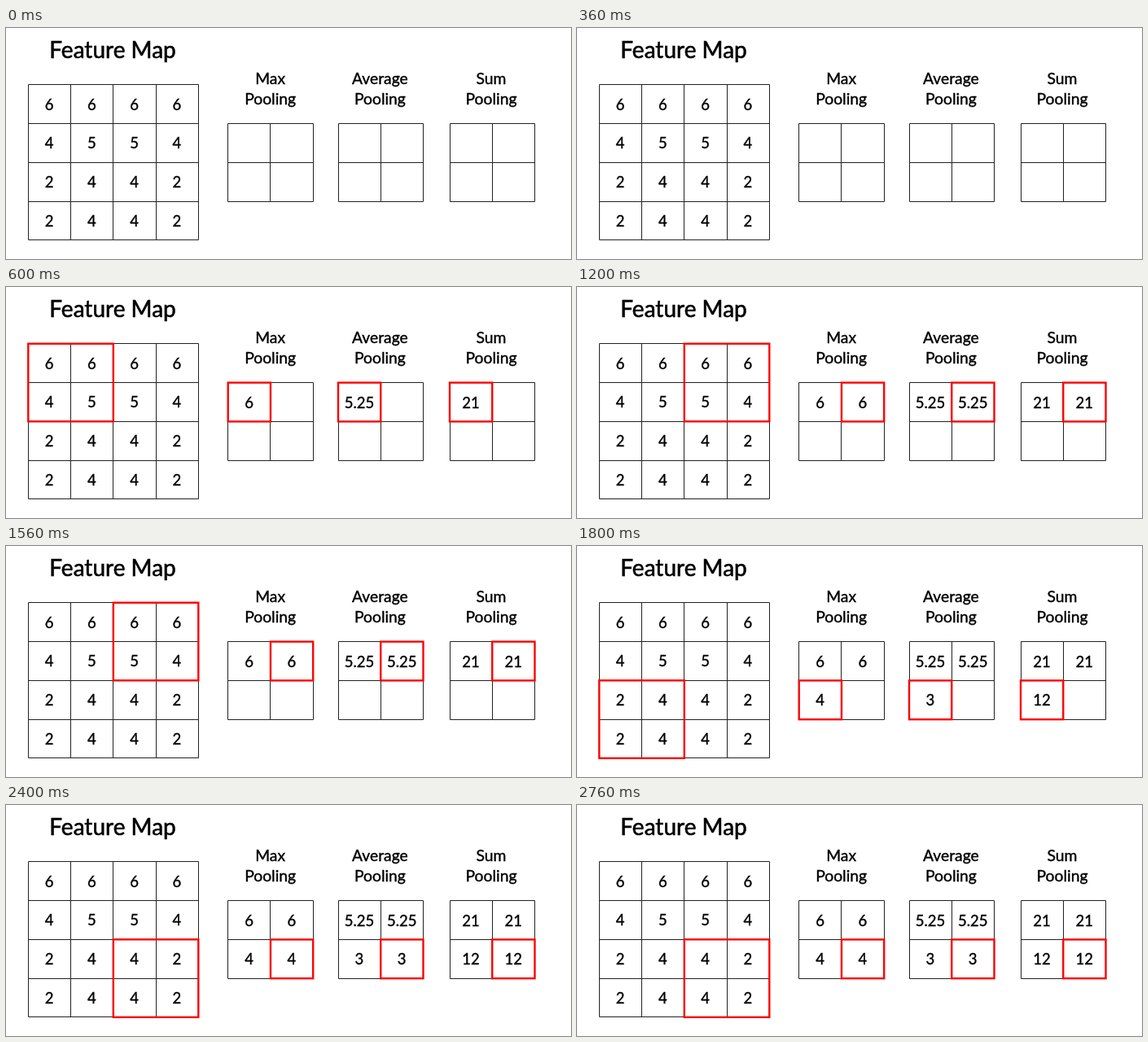
An HTML page with a canvas for the animation above (3000 ms loop, 694x284 px).

```html
<!DOCTYPE html>
<html lang="en">
<head>
<meta charset="utf-8">
<title>Pooling</title>
<style>
  html, body { margin: 0; width: 100%; height: 100%; overflow: hidden; background: #fff; }
  canvas { display: block; }
</style>
</head>
<body>
<canvas width="694" height="284"></canvas>
<script>
const ctx = document.querySelector('canvas').getContext('2d');
const STEP = 600, STEPS = 5;
const CELL_W = 52.25, CELL_H = 47.8;
const MAP = { x: 27.3, y: 69.7 };
const POOL_Y = 117.6;

const features = [
  [6, 6, 6, 6],
  [4, 5, 5, 4],
  [2, 4, 4, 2],
  [2, 4, 4, 2],
];
const sum = values => values.reduce((a, b) => a + b);
const pools = [
  { name: 'Max', x: 272.7, labelX: 324.6, pool: v => Math.max(...v) },
  { name: 'Average', x: 408, labelX: 459.4, pool: v => sum(v) / v.length },
  { name: 'Sum', x: 545, labelX: 596, pool: sum },
];

// A fine outline gives the letters a slightly heavier weight.
function text(value, x, baseline, size) {
  ctx.font = `${size}px Lato, sans-serif`;
  ctx.strokeStyle = '#000';
  ctx.lineWidth = size * 0.02;
  ctx.fillText(value, x, baseline);
  ctx.strokeText(value, x, baseline);
}

function cellText(value, x, y, col, row) {
  text(value, x + (col + 0.5) * CELL_W - 0.2, y + (row + 0.5) * CELL_H + 7, 18.5);
}

function grid(x, y, n) {
  const snap = v => Math.floor(v) + 0.5;
  ctx.strokeStyle = '#222';
  ctx.lineWidth = 1;
  ctx.beginPath();
  for (let i = 0; i <= n; i++) {
    const lineX = snap(x + i * CELL_W), lineY = snap(y + i * CELL_H);
    ctx.moveTo(lineX, snap(y));
    ctx.lineTo(lineX, snap(y + n * CELL_H));
    ctx.moveTo(snap(x), lineY);
    ctx.lineTo(snap(x + n * CELL_W), lineY);
  }
  ctx.stroke();
}

function highlight(x, y, col, row, span) {
  ctx.strokeStyle = '#fa0505';
  ctx.lineWidth = 2.4;
  ctx.strokeRect(x + col * CELL_W, y + row * CELL_H, span * CELL_W, span * CELL_H);
}

function windowValues(col, row) {
  return features.slice(row * 2, row * 2 + 2).flatMap(r => r.slice(col * 2, col * 2 + 2));
}

function draw(step) {
  ctx.fillStyle = '#fff';
  ctx.fillRect(0, 0, 694, 284);
  ctx.fillStyle = '#000';
  ctx.textAlign = 'center';

  text('Feature Map', 131, 37, 28);
  grid(MAP.x, MAP.y, 4);
  features.forEach((values, row) =>
    values.forEach((v, col) => cellText(v, MAP.x, MAP.y, col, row)));

  for (const { name, x, labelX, pool } of pools) {
    text(name, labelX, 69, 19.3);
    text('Pooling', labelX, 94, 19.3);
    grid(x, POOL_Y, 2);
    for (let i = 0; i < step; i++) {
      const col = i % 2, row = i >> 1;
      cellText(pool(windowValues(col, row)), x, POOL_Y, col, row);
    }
  }

  if (step > 0) {
    const col = (step - 1) % 2, row = (step - 1) >> 1;
    highlight(MAP.x, MAP.y, col * 2, row * 2, 2);
    for (const { x } of pools) highlight(x, POOL_Y, col, row, 1);
  }
}

const start = performance.now();
function tick() {
  draw(Math.floor((performance.now() - start) / STEP) % STEPS);
  requestAnimationFrame(tick);
}
tick();
</script>
</body>
</html>
```
